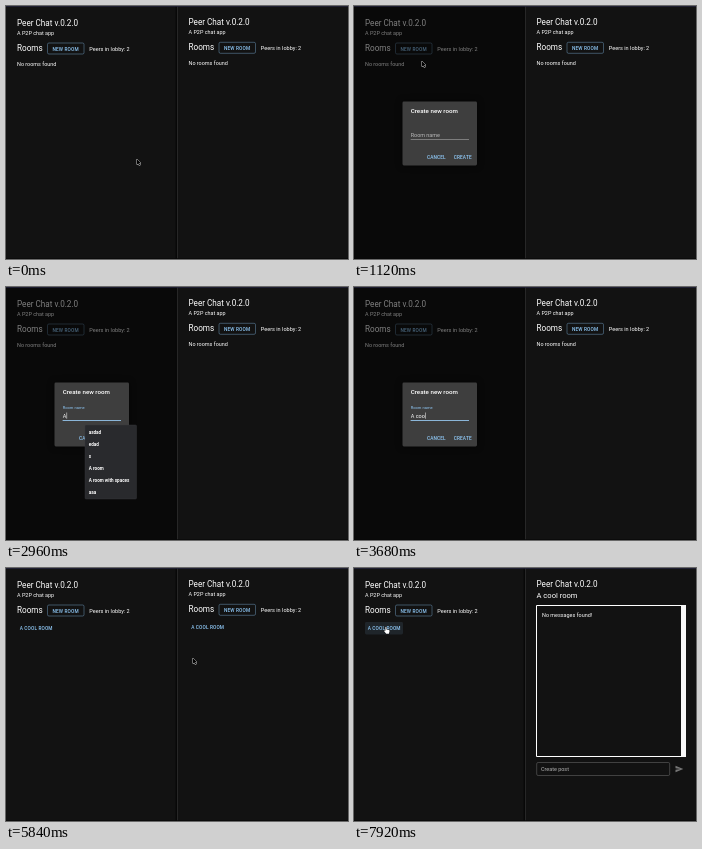
These frames come from a looping animation (342x253 px, 8000 ms). An HTML page with a canvas:

```html
<!DOCTYPE html>
<html lang="en">
<head>
<meta charset="utf-8">
<title>Peer Chat</title>
<style>
html, body { margin: 0; width: 100%; height: 100%; overflow: hidden; background: #121212; }
canvas { display: block; width: 342px; height: 253px; }
</style>
</head>
<body>
<canvas></canvas>
<script>
const W = 342, H = 253, LOOP = 8000, STEP = 80;
const BLUE = '#90caf9', WHITE = '#fff', BODY = 5.44;
const canvas = document.querySelector('canvas'), ctx = canvas.getContext('2d');
const scale = window.devicePixelRatio || 1;
canvas.width = W * scale;
canvas.height = H * scale;

// Key moments in ms
const OPEN = 680, FOCUS = 1960, SUGGEST = 2800, FILTER = 3360, CREATE = 5040, ENTER = 7040;
const typedAt = [2800, 3120, 3360, 3480, 3600, 3720, 3840, 3960, 4080, 4200, 4320];
const suggestions = ['asdad', 'edad', 's', 'A room', 'A room with spaces', 'aaa'];
const ROOM = 'A cool room';

// Pointer path: time, x, y
const path = [
  [0, 131, 153], [120, 131, 153], [560, 62, 42], [880, 62, 42], [1120, 68, 55],
  [1680, 82, 128], [4480, 82, 128], [4800, 86, 141], [4960, 107, 150], [5200, 107, 150],
  [5840, 187, 90], [6400, 192, 64], [6800, 184, 59], [7160, 184, 59], [7840, 31, 59], [8000, 31, 59]
];

const ease = p => p * p * (3 - 2 * p);
const ramp = (t, start, length) => ease(Math.min(1, Math.max(0, (t - start) / length)));

function pointerAt(t) {
  const i = path.findIndex((p, k) => k && t <= p[0]);
  const [a, b] = [path[i - 1], path[i]];
  const p = ease((t - a[0]) / (b[0] - a[0]));
  return [a[1] + (b[1] - a[1]) * p, a[2] + (b[2] - a[2]) * p];
}

// y is the middle of the capital letters
function text(s, x, y, size = BODY, color = WHITE, weight = 400, spacing = 0) {
  ctx.font = `${weight} ${size}px Roboto, sans-serif`;
  ctx.letterSpacing = spacing + 'px';
  ctx.fillStyle = color;
  ctx.fillText(s, x, y + size * 0.36);
  return ctx.measureText(s).width;
}

const label = (s, x, y) => text(s, x, y, 4.76, BLUE, 500, 0.136);

function box(x, y, w, h, r, fill, stroke, line = 0.6) {
  ctx.beginPath();
  ctx.roundRect(x, y, w, h, r);
  if (fill) { ctx.fillStyle = fill; ctx.fill(); }
  if (stroke) { ctx.strokeStyle = stroke; ctx.lineWidth = line; ctx.stroke(); }
}

function lobby(hasRoom, hoverNew, hoverRoom) {
  text('A P2P chat app', 11, 27);
  text('Rooms', 11, 42, 8.16);
  box(41.5, 37, 36.5, 11, 1.4, hoverNew && 'rgba(144,202,249,.08)', 'rgba(144,202,249,.6)');
  label('NEW ROOM', 46.5, 42.8);
  text('Peers in lobby: 2', 83.3, 42.7, 5.55);
  if (hasRoom) {
    if (hoverRoom) box(11, 54, 38, 12.5, 1.4, 'rgba(144,202,249,.1)');
    label('A COOL ROOM', 13.7, 60);
  } else {
    text('No rooms found', 11, 58);
  }
}

function room() {
  text(ROOM, 182.5, 27, 7.6);
  box(182.5, 37.5, 149, 151, 0, null, WHITE, 1);
  box(327, 37, 5, 152, 0, '#f8f8f8');
  text('No messages found!', 188, 46.7);
  box(182.7, 194.5, 133, 13, 1.4, null, '#626262');
  text('Create post', 187, 201, BODY, '#b4b4b4');
  ctx.fillStyle = '#777';
  ctx.fill(new Path2D('M321.5 197.8L329.3 201L321.5 204.2V201.7L326.5 201L321.5 200.3Z'));
}

function dialog(t) {
  const alpha = ramp(t, OPEN, 225) * (1 - ramp(t, CREATE, 195));
  if (!alpha) return;
  ctx.globalAlpha = alpha;
  box(0, 0, 171, H, 0, 'rgba(0,0,0,.5)');
  ctx.shadowColor = 'rgba(0,0,0,.6)';
  ctx.shadowBlur = 6 * scale;
  box(48.5, 95.5, 74.5, 64, 1.4, '#3e3e3e');
  ctx.shadowBlur = 0;
  text('Create new room', 56.7, 105, 6.2, WHITE, 500);

  const focus = ramp(t, FOCUS, 200);
  text('Room name', 56.7, 129 - 8.7 * focus, BODY - 1.36 * focus, focus > 0.5 ? BLUE : '#bbb');
  box(56.7, 133.5, 58.3, 0.5, 0, '#bbb');
  if (focus) box(85.85 - 29.15 * focus, 133.2, 58.3 * focus, 0.9, 0, BLUE);

  const count = typedAt.filter(k => k <= t).length;
  const width = text(ROOM.slice(0, count), 56.7, 128.7, 5.5);
  const typing = typedAt.some(k => t >= k && t < k + 400);
  if (focus && t < 4640 && (typing || (t - FOCUS) % 1000 < 500))
    box(57 + width, 125.5, 0.5, 6.3, 0, WHITE);

  label('CANCEL', 73, 151);
  label('CREATE', 99.7, 151);
  if (t >= SUGGEST && t < FILTER) {
    const items = count > 1 ? suggestions.slice(3, 5) : suggestions;
    box(79, 138, 51.5, 2 + 12 * items.length, 1, '#292a2d', '#3c3c3f', 0.4);
    items.forEach((s, i) => text(s, 82.7, 145 + 12 * i, 4.6, WHITE, 600));
  }
  ctx.globalAlpha = 1;
}

function pointer(x, y, kind) {
  ctx.save();
  ctx.translate(x, y);
  ctx.lineJoin = 'round';
  ctx.lineWidth = 0.8;
  if (kind === 'beam') {
    box(-0.3, -3, 0.6, 6.5, 0, '#ddd');
  } else {
    const hand = kind === 'hand';
    const shape = new Path2D(hand
      ? 'M.4 0Q1.3-.5 1.5 .5V2.4L4 3Q4.8 3.3 4.5 4.5L3.9 6.7H1.2L-1 4Q-.8 3.1 .4 3.8Z'
      : 'M0 0V5.6L1.3 4.4L2.2 6.5L3.2 6.1L2.3 4H4Z');
    ctx.fillStyle = hand ? WHITE : '#000';
    ctx.strokeStyle = hand ? '#000' : WHITE;
    ctx.stroke(shape);
    ctx.fill(shape);
  }
  ctx.restore();
}

function draw(t) {
  const [x, y] = pointerAt(t);
  const over = (l, top, w, h) => x >= l && x < l + w && y >= top && y < top + h;
  const open = t >= OPEN && t < CREATE + 195, created = t >= CREATE + 80;
  const overNew = !open && over(41.5, 37, 36.5, 11);
  const overLeft = created && over(11, 54, 38, 13);
  const overRight = created && t < ENTER && over(182.5, 53, 38, 13);

  ctx.setTransform(scale, 0, 0, scale, 0, 0);
  box(0, 0, W, H, 0, '#121212');
  text('Peer Chat v.0.2.0', 11, 17, 8.16);
  lobby(created, overNew, overLeft && t >= 7900);
  dialog(t);

  text('Peer Chat v.0.2.0', 182.5, 16.3, 8.16);
  if (t >= ENTER) {
    room();
  } else {
    ctx.save();
    ctx.translate(171.5, -0.7);
    lobby(created, false, overRight);
    ctx.restore();
  }

  box(169.5, 0, 2.5, H, 0, '#080808');
  box(171, 0, 0.8, H, 0, '#303030');
  box(0, 0, W, 0.8, 0, '#25253d');
  box(0, H - 0.8, W, 0.8, 0, '#080808');

  const inField = open && over(56, 122, 59, 12);
  const inButton = open && (over(71, 147, 24, 9) || over(97, 147, 23, 9));
  const hidden = t >= SUGGEST && t < 4560;
  if (!hidden) pointer(x, y, inField ? 'beam' : overNew || overLeft || inButton ? 'hand' : 'arrow');
}

function tick() {
  draw(Math.floor(performance.now() % LOOP / STEP) * STEP);
  requestAnimationFrame(tick);
}
tick();
</script>
</body>
</html>
```
